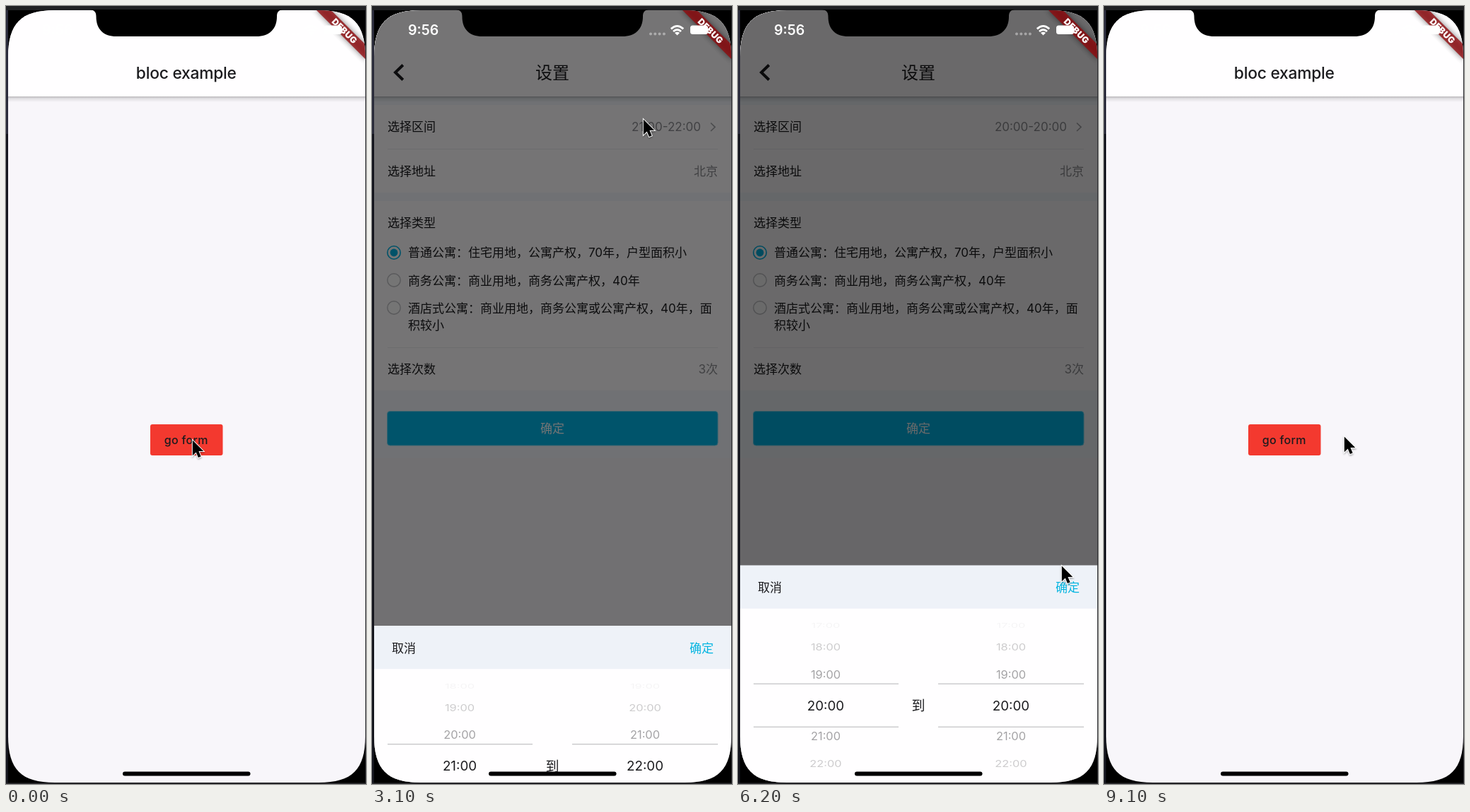
Animation of 509x1101 px, one loop 9300 ms. Source, as an HTML page:

```html
<!DOCTYPE html>
<html lang="zh-CN">
<head>
<meta charset="utf-8">
<title>bloc example</title>
<style>
  html, body { margin: 0; width: 100%; height: 100%; overflow: hidden; background: #000; }
  svg { display: block; width: 509px; height: 1101px; }
  text { font: 400 17px Inter, "Noto Sans CJK SC", "Noto Sans CJK", sans-serif; fill: #1b1b1e; }
  .mid { text-anchor: middle; }
  .end { text-anchor: end; }
  .dim { fill: #8d8d92; }
  .white { fill: #fff; }
  .title { font-size: 24px; font-weight: 500; }
  .accent { fill: #00b4e0; }
  .line { stroke: #ececf1; }
  .rule { stroke: #b4b4b8; }
  .off { fill: #fff; stroke: #c2c2c7; stroke-width: 1.4; }
</style>
</head>
<body>
<svg viewBox="0 0 509 1101">
  <defs>
    <clipPath id="screen"><path d="M3 72C3 24.500 21.500 6 69 6H442C489.500 6 508 24.500 508 72V1033C508 1080.500 489.500 1099 442 1099H69C21.500 1099 3 1080.500 3 1033Z"/></clipPath>
    <clipPath id="window"><rect x="3" y="826" width="505" height="273"/></clipPath>
    <linearGradient id="shade" x2="0" y2="1">
      <stop stop-color="#000" stop-opacity=".26"/>
      <stop offset=".35" stop-color="#000" stop-opacity=".1"/>
      <stop offset="1" stop-color="#000" stop-opacity="0"/>
    </linearGradient>
    <filter id="blur" x="-50%" y="-50%" width="200%" height="200%"><feGaussianBlur stdDeviation="4"/></filter>
    <filter id="soft" x="-50%" y="-50%" width="200%" height="200%"><feDropShadow dx="0" dy="1.5" stdDeviation="1.3" flood-opacity=".35"/></filter>
    <g id="bar">
      <rect x="3" y="6" width="505" height="122" fill="#fffeff"/>
      <rect x="3" y="128" width="505" height="8" fill="url(#shade)"/>
    </g>
  </defs>

  <rect width="509" height="1101" fill="#000"/>
  <rect width="509" height="6" fill="#202124"/>
  <rect y="6" width="3" height="175" fill="#2a2b3a"/>
  <rect y="181" width="3" height="920" fill="#14151d"/>
  <rect x="508" y="6" width="1" height="1095" fill="#2c2c30"/>
  <rect y="1099.5" width="509" height="1.5" fill="#2c2c30"/>

  <g clip-path="url(#screen)">
    <g id="home">
      <rect x="3" y="6" width="505" height="1093" fill="#f8f6fa"/>
      <use href="#bar"/>
      <text class="title mid" x="254.800" y="102.500" style="font-size:22.8px;letter-spacing:-.25px">bloc example</text>
      <rect x="204" y="592" width="102.5" height="44" rx="3" fill="#f3392f"/>
      <text class="mid" x="254.8" y="620" style="font-size:16px;font-weight:500;letter-spacing:.3px">go form</text>
    </g>

    <g id="form">
      <rect x="3" y="6" width="505" height="1093" fill="#f8f6fa"/>
      <rect x="3" y="128" width="505" height="512" fill="#f4f8fd"/>
      <path d="M3 140H508V264H3ZM3 276H508V544H3Z" fill="#fffeff"/>
      <path class="line" d="M22 202.5H489M22 483.5H489"/>
      <use href="#bar"/>
      <path d="M43.8 83.5L33 94L43.8 104.5" fill="none" stroke="#1b1b1e" stroke-width="4"/>
      <text class="title mid" x="255" y="103.3">设置</text>
      <text x="22" y="177.3">选择区间</text>
      <text id="range" class="dim end" x="465" y="177">21:00-22:00</text>
      <path d="M479 165.5L485 171.3L479 177" fill="none" stroke="#a5a5aa" stroke-width="1.6"/>
      <text x="22" y="239.5">选择地址</text>
      <text class="dim end" x="489" y="239.5">北京</text>
      <text x="22" y="312.7">选择类型</text>
      <circle cx="31" cy="349" r="9.2" fill="#fff" stroke="#00b4e6" stroke-width="1.6"/>
      <circle cx="31" cy="349" r="5.4" fill="#00b4e6"/>
      <circle class="off" cx="31" cy="388" r="9.2"/>
      <circle class="off" cx="31" cy="427" r="9.2"/>
      <text x="51" y="355.3">普通公寓：住宅用地，公寓产权，70年，户型面积小</text>
      <text x="51" y="394.5">商务公寓：商业用地，商务公寓产权，40年</text>
      <text x="51" y="433.5">酒店式公寓：商业用地，商务公寓或公寓产权，40年，面</text>
      <text x="51" y="458.3">积较小</text>
      <text x="22" y="520.3">选择次数</text>
      <text class="dim end" x="489" y="520.3">3次</text>
      <rect x="21.5" y="573.5" width="467.5" height="48.5" rx="4" fill="#00b7eb" stroke="#7fdcf5"/>
      <text class="white mid" x="255" y="604.3" style="font-weight:500">确定</text>
    </g>

    <rect id="barrier" x="3" y="6" width="505" height="1093" fill="#000"/>

    <g id="sheet">
      <rect x="3" y="765" width="505" height="340" fill="#fffeff"/>
      <rect x="3" y="765" width="505" height="61" fill="#eef2f8"/>
      <text x="28" y="802.3">取消</text>
      <text class="accent" x="449" y="802.3">确定</text>
      <path class="rule" d="M22 932.5H227M283 932.5H489M22 993.5H227M283 993.5H489"/>
      <text class="mid" x="255" y="970.3" style="font-size:19px">到</text>
      <g id="wheels" clip-path="url(#window)"></g>
    </g>

    <g id="toast">
      <rect x="205.5" y="518" width="99.5" height="69" rx="11" fill="#000" fill-opacity=".56"/>
      <text class="white mid" x="255.3" y="558.7">保存成功!</text>
    </g>

    <g transform="translate(508 6) rotate(45)">
      <rect x="-49" y="34.2" width="98" height="14.6" fill="#000" opacity=".5" filter="url(#blur)"/>
      <rect x="-49" y="34.2" width="98" height="14.6" fill="#93080c" fill-opacity=".77"/>
      <text class="white mid" y="46" style="font-size:12.4px;font-weight:900;letter-spacing:.3px">DEBUG</text>
    </g>

    <text class="white" x="51" y="41" style="font-size:19.6px;font-weight:600">9:56</text>
    <g fill="#fff">
      <g fill-opacity=".4">
        <circle cx="394" cy="39.5" r="2"/><circle cx="400.3" cy="39.5" r="2"/>
        <circle cx="406.6" cy="39.5" r="2"/><circle cx="412.9" cy="39.5" r="2"/>
      </g>
      <path d="M422.8 32.4Q431.5 24.4 440.2 32.4M426 36Q431.5 31 437 36" fill="none" stroke="#fff" stroke-width="2.8"/>
      <path d="M431.5 41.5L428 38Q431.5 35.4 435 38Z"/>
      <rect x="450" y="27.5" width="25" height="12.5" rx="3.5"/>
      <path d="M476.5 31.5Q479 33.7 476.5 36Z"/>
    </g>
    <rect x="165" y="1083.5" width="180.5" height="6" rx="3" fill="#000"/>
  </g>

  <path d="M119 5C125 6 127.5 8.5 127.5 15C127.5 33 138 43 156 43H354C372 43 383 33 383 15C383 8.5 385.5 6 391 5Z" fill="#000"/>

  <g id="cursor" filter="url(#soft)">
    <path transform="translate(.8 1.4) scale(.93)" d="M0 0V23.5L5.3 18.5L8.7 26.5L12.7 24.8L9.3 16.9H16.6Z" stroke="#fff" stroke-width="2" paint-order="stroke"/>
  </g>
</svg>
<script>
const LOOP = 9300, STEP = 100, WIDTH = 505, SHEET = 334;
const $ = id => document.getElementById(id);
const clamp = x => Math.min(1, Math.max(0, x));
const span = (t, from, to) => clamp((t - from) / (to - from));
const smooth = x => x * x * (3 - 2 * x);
const move = (id, x, y) => $(id).setAttribute('transform', `translate(${x.toFixed(2)} ${y.toFixed(2)})`);

function bezier(x1, y1, x2, y2) {
  const at = (a, b, s) => 3 * a * s * (1 - s) ** 2 + 3 * b * s * s * (1 - s) + s ** 3;
  return x => {
    let lo = 0, hi = 1;
    for (let i = 0; i < 24; i++) {
      const s = (lo + hi) / 2;
      if (at(x1, x2, s) < x) lo = s; else hi = s;
    }
    return x <= 0 ? 0 : x >= 1 ? 1 : at(y1, y2, lo);
  };
}
const ease = bezier(.25, .1, .25, 1);
const slide = bezier(.35, .91, .33, .97);

// rows of [time, ...values], eased between rows
function track(rows, t) {
  let i = 0;
  while (i < rows.length - 2 && t >= rows[i + 1][0]) i++;
  const [a, b] = [rows[i], rows[i + 1]];
  const k = smooth(span(t, a[0], b[0]));
  return a.slice(1).map((v, j) => v + (b[j + 1] - v) * k);
}

const pointer = [
  [0, 263, 613], [1200, 263, 613], [2500, 383, 159], [3200, 383, 159],
  [3700, 135, 930], [3800, 135, 930], [4100, 130, 976], [4400, 385, 938],
  [4500, 385, 938], [4800, 394, 1016], [5100, 394, 1016], [5700, 457, 791],
  [6300, 457, 791], [7100, 339, 608]
];
const startHour = [[3800, 21], [4200, 20]];
const endHour = [[4450, 22], [4800, 20.27], [5100, 20]];

function makeWheel(x) {
  const items = [];
  for (let i = -3; i <= 3; i++) {
    const el = document.createElementNS('http://www.w3.org/2000/svg', 'text');
    el.setAttribute('class', 'mid');
    $('wheels').append(el);
    items.push([i, el]);
  }
  return value => {
    const base = Math.round(value);
    for (const [i, el] of items) {
      const n = base + i - value, angle = n * .323, near = Math.abs(n) < .5;
      const size = near ? 18.8 : 16.4;
      el.textContent = `${String((base + i + 24) % 24).padStart(2, '0')}:00`;
      el.style.fontSize = size + 'px';
      el.style.opacity = near ? 1 : clamp(Math.min(.42, .4 - .18 * (Math.abs(n) - 1)));
      el.setAttribute('y', size * .363);
      el.setAttribute('transform', `translate(${x} ${963 + 137 * Math.sin(angle)}) scale(1 ${Math.cos(angle)})`);
    }
  };
}
const leftWheel = makeWheel(124), rightWheel = makeWheel(386);

function draw(t) {
  const shown = slide(span(t, 350, 800)) - slide(span(t, 7530, 8030));
  move('home', -WIDTH / 3 * shown, 0);
  move('form', WIDTH * (1 - shown), 0);
  $('range').textContent = t < 6150 ? '21:00-22:00' : '20:00-20:00';

  const open = t < 5000 ? span(t, 2934, 3184) : 1 - span(t, 6184, 6384);
  $('barrier').style.opacity = .585 * ease(open);
  move('sheet', 0, SHEET * (1 - open));
  $('sheet').style.display = open ? '' : 'none';
  leftWheel(track(startHour, t)[0]);
  rightWheel(track(endHour, t)[0]);

  $('toast').style.opacity = span(t, 7400, 7600) - span(t, 8650, 9050);
  move('cursor', ...track(pointer, t));
}

function tick() {
  draw(Math.floor(performance.now() % LOOP / STEP) * STEP);
  requestAnimationFrame(tick);
}
tick();
</script>
</body>
</html>
```
